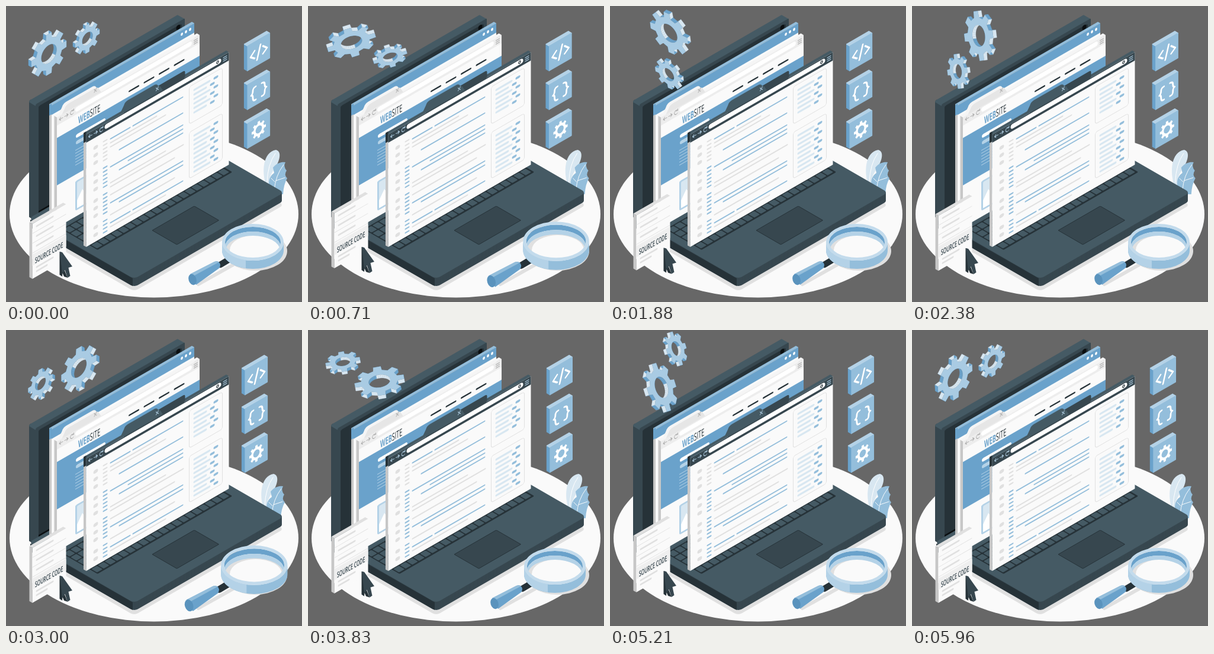
Recreate the animation shown at these times as an HTML page. Size 500x500 px, loop 6000 ms.

```html
<!DOCTYPE html>
<html lang="en">
<head>
<meta charset="utf-8">
<title>Source code</title>
<style>
html, body { margin: 0; width: 100%; height: 100%; overflow: hidden; background: #676767; }
svg { display: block; width: 100vw; height: 100vh; }
text { font-family: "Open Sans", "Noto Sans", sans-serif; }
</style>
</head>
<body>
<svg id="stage" viewBox="0 0 500 500"></svg>
<script>
const ink = '#263238', slate = '#37474f', steel = '#455a64';
const blue = '#6aa2cb', sky = '#94bedb', pale = '#b4d2e7', mist = '#d8e7f1';
const paper = '#fafafa', grey = '#e0e0e0', dim = '#c7c7c7';
const SLOPE = .577;

const range = n => [...Array(n).keys()];
const loop = (n, fn) => range(n).map(fn).join('');
const poly = (pts, fill, more = '') => `<polygon points="${pts}" fill="${fill}" ${more}/>`;
const path = (d, fill, more = '') => `<path d="${d}" fill="${fill}" ${more}/>`;
const line = (d, color, w) =>
  path(d, 'none', `stroke="${color}" stroke-width="${w}" stroke-linecap="round" stroke-linejoin="round"`);
const rect = (x, y, w, h, fill, r = 0, more = '') =>
  `<rect x="${x}" y="${y}" width="${w}" height="${h}" rx="${r}" fill="${fill}" ${more}/>`;
const bar = (x, y, w, h, fill) => rect(x, y - h / 2, w, h, fill, h / 2);
const oval = (x, y, rx, ry, fill) => `<ellipse cx="${x}" cy="${y}" rx="${rx}" ry="${ry}" fill="${fill}"/>`;
const group = (id, body) => `<g id="${id}">${body}</g>`;
const label = (x, y, size, body) =>
  `<text transform="translate(${x} ${y}) scale(.53 1)" font-size="${size}">${body}</text>`;

// Upright plane rising to the right, and the ground plane
const wall = (x, y, body) => `<g transform="matrix(1 ${-SLOPE} 0 1 ${x} ${y})">${body}</g>`;
const ground = (x, y, body) => `<g transform="matrix(.866 -.5 .866 .5 ${x} ${y})">${body}</g>`;

// Upright box, in wall coordinates, with visible left and top sides
function slab(x, y, w, h, depth, [face, side, top], r = 0) {
  const round = c => `stroke="${c}" stroke-width="${2 * r}" stroke-linejoin="round"`;
  const dx = x - depth, dy = y - 2 * SLOPE * depth;
  return poly([x, y, dx, dy, dx, dy + h, x, y + h], side, round(side)) +
    poly([x, y, dx, dy, dx + w, dy, x + w, y], top, round(top)) +
    poly([x, y, x + w, y, x + w, y + h, x, y + h], face, round(face));
}

function gear(cx, cy, R, depth, face) {
  const at = (r, turn) => [r * Math.cos(turn * 2 * Math.PI), r * Math.sin(turn * 2 * Math.PI)];
  const project = ([a, b]) => [cx + .866 * a, cy - .5 * a + b];
  const rim = range(32).map(i => {
    const tip = i % 4 === 1 || i % 4 === 2;
    const offset = (i % 4 < 2 ? -1 : 1) * (tip ? .19 : .29);
    return at(R * (tip ? 1 : .75), (Math.floor(i / 4) + offset) / 8);
  });
  const hole = range(32).map(i => at(R * .44, i / 32));
  const sides = (ring, sign) => loop(ring.length, i => {
    const p = ring[i], q = ring[(i + 1) % ring.length];
    const up = sign * (q[0] - p[0]) / Math.hypot(q[0] - p[0], q[1] - p[1]);
    const color = up > .55 ? mist : blue;
    const [a, b] = [project(p), project(q)];
    const back = ([x, y]) => [x - depth, y - depth * SLOPE];
    return poly([a, b, back(b), back(a)], color, `stroke="${color}" stroke-width=".3"`);
  });
  const outline = ring => 'M' + ring.map(project).join('L') + 'Z';
  return (depth ? sides(rim, 1) + sides(hole, -1) : '') +
    path(outline(rim) + outline(hole), face, 'fill-rule="evenodd"');
}

function plant() {
  const back = path('M440 305C431 280 434 247 456 243C467 246 462 263 453 276C447 284 444 292 444 306Z', mist) +
    line('M441 298Q442 267 455 249', '#fff', 1);
  const front = path('M450 318C440 300 444 288 453 282L451 273C457 265 466 263 472 264Q468 271 474 278Q469 285 475 291Q469 301 468 318Z', sky) +
    line('M453 312Q455 286 469 268M456 295L471 290M454 297L448 291', '#fff', .9);
  return back + front;
}

function laptop() {
  const deck = (drop, color) => ground(39, 358.5 + drop, rect(0, 0, 292, 205, color, 7));
  const screen = wall(52, 167, slab(0, 0, 248, 194, 11, [slate, slate, steel], 2) +
    rect(3, 4, 242, 184, ink, 3) + rect(3, 181, 20, 7, '#0b0f11') + oval(239, 7, 3.5, 4, '#0b0f11'));
  const keys = loop(100, n => {
    const row = Math.floor(n / 20), col = n % 20;
    return rect(2 + col * 13, 2 + row * 13.4, 11, 11.4, steel, 1.5);
  });
  return deck(21, grey) + group('plant', plant()) + screen +
    loop(14, i => deck(14 - i, slate)) + poly('41,361 214,460 214,473 41,374', ink) + deck(0, steel) +
    ground(94, 377, rect(0, 0, 263, 70, ink, 2) + keys) +
    ground(247, 379, rect(0, 0, 82, 48, slate, 1, `stroke="${ink}"`));
}

// Browser window whose origin is the top left corner of its page
function browser(h, tabX, { face, tab, rim, side, icon }, extra = '') {
  const shape = `M${tabX} -13L${tabX + 5} -21Q${tabX + 7} -26 ${tabX + 12} -26H${tabX + 56}Q${tabX + 61} -26 ${tabX + 63} -21L${tabX + 67} -13Z`;
  return slab(0, -14, 241, h + 14, 4.5, [paper, side, rim]) + extra +
    `<g transform="translate(-4.5 -5.2)">${path(shape, rim)}</g>` + path(shape, tab) +
    rect(0, -14, 241, 14, face) +
    `<g transform="translate(3 -7.8)">` +
      line('M7 0H1M3.5-2.5L1 0L3.5 2.5M10 0H16M13.5-2.5L16 0L13.5 2.5M25-2A3 3.4 0 1 0 25 2.5M25.4-4V-1.6H23', icon, 1) + '</g>' +
    bar(31, -8, 197, 8, '#fff') +
    loop(3, i => bar(231, -10 + 3 * i, 7, 1.3, icon)) +
    `<g transform="translate(${tabX + 57} -22)">${line('M-2-2.5L2 2.5M2-2.5L-2 2.5', icon, 1)}</g>`;
}

function sitePages() {
  const back = slab(0, -16, 241, 206, 4, [paper, dim, sky]) + rect(0, -16, 241, 16, blue) +
    rect(-4, -19, 4, 18, blue) +
    loop(3, i => oval(220 + 7 * i, -9.5, 1.9, 2.4, '#fff'));
  const dashes = loop(4, i => bar(121 + 25.5 * i, 12.6, 18, 2.6, ink));
  const hero = rect(0, 21, 241, 80, blue) + bar(32, 37, 50, 6, '#fff') + bar(32, 48, 50, 6, pale) +
    loop(6, i => bar(31, 60 + i * 5, 60, 1, pale));
  const photo = rect(31, 112, 60, 50, pale, 3) + rect(34, 115, 57, 44, mist, 2) +
    path('M34 159V146L43 132L58 159Z', '#fff');
  const title = label(36, 18, 17,
    `<tspan font-weight="700" fill="${blue}">WEB</tspan><tspan fill="${ink}">SITE</tspan>`);
  const look = { face: '#ededed', tab: '#e6e6e6', rim: '#f5f5f5', side: dim, icon: '#aaa' };
  return wall(77, 184, back) + wall(86, 202, browser(172, 8, look) + dashes + hero + photo + title);
}

function codeWindow() {
  let seed = 5;
  const rnd = n => (seed = seed * 16807 % 2147483647) % n;
  const rows = 'sgg.b..bbb.gg.g.bb.g.sg';
  const code = loop(rows.length, i => {
    const v = 17 + 6.75 * i, x = 40 + 15 * rnd(3);
    return {
      s: bar(40, v, 35, 2.2, sky) + bar(78, v, 86, 2.2, sky),
      b: bar(x, v, 164 - x, 2.2, sky),
      g: bar(40, v, 80 + 15 * rnd(4), 2.2, grey)
    }[rows[i]] || '';
  });
  const gutter = loop(11, i => {
    const v = 17 + 12.8 * i + 6.5 * Math.floor(i / 3);
    const color = i < 3 ? grey : sky;
    return bar(12, v, 8, 6, grey) + bar(28, v - 2, 8, 2.4, color) + bar(28, v + 4.5, 8, 2.4, color);
  });
  const panel = (top, h, count) => rect(174, top, 56, h, paper, 4, `stroke="${grey}"`) +
    loop(count, i => {
      const inset = i % 2 * 6, v = top + 10 + i * 7.6;
      return bar(181, v, 29 - inset, 3.6, mist) + bar(215 - inset, v, 8, 4, sky);
    });
  const look = { face: slate, tab: steel, rim: steel, side: dim, icon: pale };
  return wall(135.5, 231, browser(176, 63, look, rect(118, -26, 49, 13, slate, 3)) +
    rect(-4.5, -19, 4.5, 17, ink) + oval(222, -8, 2.2, 2.6, ink) + oval(222, -8, 1, 1.3, '#fff') +
    gutter + code + panel(6, 63, 6) + panel(83, 78, 9));
}

function tiles() {
  const marks = [
    line('M12 15L5 22L12 28M26 15L33 22L26 28M22 10L16 33', '#fff', 2.8),
    line('M14 11Q9 11 9 16T6 22Q9 22 9 28T14 33M24 11Q29 11 29 16T32 22Q29 22 29 28T24 33', '#fff', 2.8)
  ];
  return loop(3, i => wall(408, 67.5 + 65.5 * i,
    slab(0, 0, 37.5, 42, 5.5, [sky, blue, pale], .6) + (marks[i] || '')) +
    (i === 2 ? gear(427, 208.5, 14, 0, '#fff') : ''));
}

function card() {
  const text = label(4.5, 69.5, 13, `<tspan font-weight="600" fill="${slate}">SOURCE CODE</tspan>`);
  return wall(44.5, 368, slab(0, 0, 57, 93, 5, [paper, dim, grey]) +
    loop(3, i => bar(6, 8 + 16.5 * i, 30, 3, grey) + rect(0, 16 + 16.5 * i, 57, .9, grey)) +
    rect(0, 52, 57, 19, '#efefef') + bar(6, 77, 30, 3, grey) + bar(6, 84, 20, 3, grey) + text);
}

const cursor = () =>
  path('M90.5 415L95 417L99 447L104 459L98 457L95.5 451L95 457L90.5 454Z', ink) +
  path('M91 415L95 416L112 440L105.5 442L108.5 456L104 459L99.5 446L95 452Z', slate);

const ring = (x, y, rx, ry) => `M${x - rx} ${y}a${rx} ${ry} 0 1 0 ${2 * rx} 0a${rx} ${ry} 0 1 0 ${-2 * rx} 0Z`;
const band = (outer, inner, color) => path(ring(...outer) + ring(...inner), color, 'fill-rule="evenodd"');

const lensShadow = () => band([421, 414, 54, 33], [422, 412, 44, 25], grey) +
  line('M325 470L384 437', grey, 6);

function lens() {
  const inside = `<clipPath id="hole">${oval(417, 399, 47, 26, '#000')}</clipPath><g clip-path="url(#hole)">` +
    band([417, 399, 48, 27], [417, 407, 47, 26], blue) +
    band([417, 407, 47, 26], [417, 413, 46, 25], pale) + '</g>';
  const side = path('M365 399V413A52 31 0 0 0 469 413V399A52 31 0 0 1 365 399Z', sky) +
    path('M405 429V443A52 31 0 0 1 365 413V399A52 31 0 0 0 405 429Z', pale);
  const handle = line('M362 437L377 428', ink, 10.5) +
    path('M311 453L352 432Q360 429 362 437Q362 441 360 443L321 471Z', blue) +
    path('M311 453L352 432Q356 430 359 433L315 457Z', sky) +
    `<g transform="rotate(-18 315 462)">${oval(315, 462, 6.5, 9.5, '#5a93bd')}</g>`;
  return handle + inside + side + band([417, 399, 52, 31], [417, 399, 47, 26], '#c3dbec');
}

document.getElementById('stage').innerHTML = oval(250, 351.5, 244, 141, paper) +
  laptop() + sitePages() + codeWindow() +
  group('gears', gear(72.5, 81, 34.5, 5, '#a9cbe3') + gear(137.5, 55, 24, 4, '#a9cbe3')) +
  group('tiles', tiles()) + group('card', card()) + group('cursor', cursor()) +
  lensShadow() + group('lens', lens());

// Shake: mirrored steps at every tenth of the loop
function shake(p) {
  const steps = [0, -1, 2, -4, 4, -4, -4];
  const q = 10 * Math.min(p, 1 - p), i = Math.floor(q);
  return steps[i] + (steps[i + 1] - steps[i]) * (q - i);
}

// Heartbeat: two linear bumps
const bump = (p, from, peak, to) =>
  Math.max(0, Math.min((p - from) / (peak - from), (to - p) / (to - peak)));
const beat = p => bump(p, 0, .1, .3) + bump(p, .4, .5, .6);

// cubic-bezier(.25, .1, .25, 1), solved by halving
function ease(x) {
  let lo = 0, hi = 1, s = .5;
  for (let i = 0; i < 20; i++) {
    s = (lo + hi) / 2;
    if (.75 * s * (1 - s) + s ** 3 < x) lo = s; else hi = s;
  }
  return .3 * s * (1 - s) ** 2 + 3 * s * s * (1 - s) + s ** 3;
}

function lift(t) {
  const p = t % 1500 / 750;
  return p < 1 ? ease(p) : 1 - ease(p - 1);
}

const move = (id, value) => document.getElementById(id).setAttribute('transform', value);

function draw(now) {
  const t = now % 6000, p = t / 6000;
  move('gears', `rotate(${p * 360} 97.8 72.5)`);
  for (const id of ['tiles', 'plant']) move(id, `translate(${shake(p)} 0)`);
  move('card', `translate(0 ${-18 * lift(t)})`);
  move('cursor', `translate(0 ${-8 * lift(t)})`);
  move('lens', `translate(388 420) scale(${1 + .08 * beat(p)}) translate(-388 -420)`);
}

const start = performance.now();
function tick() {
  draw(performance.now() - start);
  requestAnimationFrame(tick);
}
tick();
</script>
</body>
</html>
```
